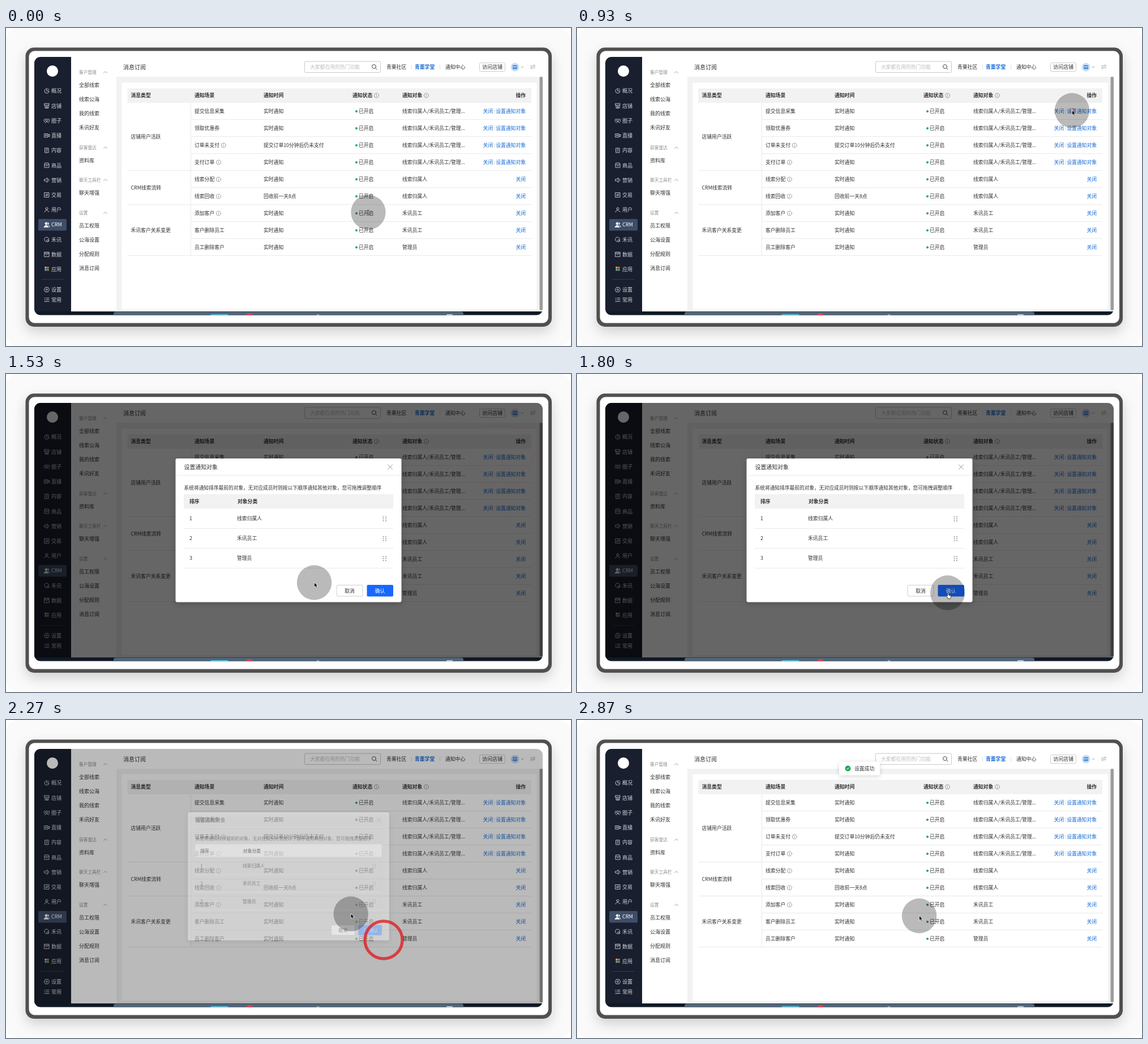
Write an HTML page with a canvas that moves like this. It is 998x561 px and loops after 3.07 s.

```html
<!DOCTYPE html>
<html lang="zh-CN">
<head>
<meta charset="utf-8">
<style>
html, body { margin: 0; height: 100%; overflow: hidden; background: #fff; }
canvas { display: block; width: 998px; height: 561px; }
</style>
</head>
<body>
<canvas></canvas>
<script>
const LOOP = 3070, STEP = 1000 / 15;
const canvas = document.querySelector('canvas'), c = canvas.getContext('2d');
const dpr = window.devicePixelRatio || 1;
canvas.width = 998 * dpr;
canvas.height = 561 * dpr;

const INK = '#303030', BLUE = '#176bd3', LINE = '#e9e9e9', GREY = '#8c8c8c';

const ramp = (t, a, b) => Math.min(1, Math.max(0, (t - a) / (b - a)));
const ease = u => u * u * (3 - 2 * u);

function box(x, y, w, h, fill, r = 0, stroke) {
  c.beginPath();
  c.roundRect(x, y, w, h, r);
  if (fill) { c.fillStyle = fill; c.fill(); }
  if (stroke) { c.strokeStyle = stroke; c.lineWidth = 1; c.stroke(); }
}
function disc(x, y, r, fill) {
  c.beginPath();
  c.arc(x, y, r, 0, 7);
  c.fillStyle = fill;
  c.fill();
}
function text(s, x, y, size = 8.8, color = INK, weight = 400, align = 'left') {
  c.font = `${weight} ${size}px "Noto Sans CJK SC", "Noto Sans", sans-serif`;
  c.textAlign = align;
  c.fillStyle = color;
  c.fillText(s, x, y + size * .38);
  return c.measureText(s).width;
}
function path(d, x, y, color, width = 1, fill) {
  const p = new Path2D(d);
  c.save();
  c.translate(x, y);
  c.lineWidth = width;
  c.lineCap = c.lineJoin = 'round';
  if (fill) { c.fillStyle = fill; c.fill(p); }
  if (color) { c.strokeStyle = color; c.stroke(p); }
  c.restore();
}
function shadowed(blur, dy, alpha, draw) {
  c.save();
  c.shadowColor = `rgba(0,0,0,${alpha})`;
  c.shadowBlur = blur * dpr;
  c.shadowOffsetY = dy * dpr;
  draw();
  c.restore();
}
const info = (x, y) => path('M4 0A4 4 0 1 1-4 0A4 4 0 1 1 4 0M0-.5V2M0-2.1V-2', x, y, '#777', .7);

const FRAME = 'M-4-4H4V4H-4Z';
const MENU = [
  ['概况', 'M0-4A4 4 0 1 0 4 0H0ZM2-4A4 4 0 0 1 4-2'],
  ['店铺', 'M-4-4H4V-1H-4ZM-3-1V4H3V-1M-1 4V1H1V4'],
  ['圈子', 'M-2-1A2 2 0 1 1 2-1A2 2 0 1 1-2-1M-3 4Q0-1 3 4M-4 2Q-6-3-3-3M4 2Q6-3 3-3'],
  ['直播', 'M-4-3H2V3H-4ZM2-1L5-2V2L2 1M-2-1V1L0 0Z'],
  ['内容', 'M-3-4H3V4H-3ZM-1-2H1M-1 0H1M-1 2H0'],
  ['商品', 'M-3-4H3L4-1V4H-4V-1ZM-4-1H4M-1 1H1'],
  ['营销', 'M-4-1.5H-2L1-4V4L-2 1.5H-4ZM3-2Q5 0 3 2'],
  ['交易', FRAME + 'M-2 1H2M2-1H-2M1-2L2-1M-1 2L-2 1'],
  ['用户', 'M-2-2A2 2 0 1 1 2-2A2 2 0 1 1-2-2M-4 4Q-3 0 1 1M2 3H4'],
  ['CRM', 'M-3-2A2 2 0 1 1 1-2A2 2 0 1 1-3-2M-5 4Q-1-2 3 4ZM2-4Q5-2 2 0M3 1Q5 2 5 4'],
  ['禾讯', 'M3 2A4 4 0 1 0-1 3.8M0 1Q2-1 4 3L1 4Z'],
  ['数据', FRAME + 'M-2 0L0 1L2-1M-4-2H4'],
  ['应用', ''],
  ['设置', 'M-4.5 0L-2.3-4H2.3L4.5 0L2.3 4H-2.3ZM-1.5 0A1.5 1.5 0 1 1 1.5 0A1.5 1.5 0 1 1-1.5 0'],
  ['常用', 'M-4-3H-3M-1-3H4M-4 0H-3M-1 0H4M-4 3H4'],
];

function sidebar() {
  box(50, 51, 65, 449, '#191f2e');
  disc(82, 76, 10, '#fff');
  MENU.forEach(([name, icon], i) => {
    const y = i < 13 ? 111 + i * 26.22 : 461.5 + (i - 13) * 18;
    const on = name === 'CRM';
    if (on) box(57, 337, 50, 20.5, '#3e4d68', 2);
    const color = on ? '#fff' : '#d0d3d9';
    if (icon) path(icon, 72, y, color, .9, on && '#fff');
    else ['#f5a623', '#ef5350', '#42a5f5', '#4caf50'].forEach((dot, k) =>
      disc(70 + k % 2 * 4, y - 3 + (k >> 1) * 4, 1.9, dot));
    text(name, 80, y, 9.1, color);
  });
  box(62, 443, 40, 1, '#333a48');
}

const GROUPS = [
  [78, '客户管理', 101, '全部线索', '线索公海', '我的线索', '禾讯好友'],
  [211, '获客雷达', 234, '资料库'],
  [268, '聊天工具栏', 291, '聊天增强'],
  [326, '设置', 349, '员工权限', '公海设置', '分配规则', '消息订阅'],
];
function submenu() {
  for (const [y, title, top, ...items] of GROUPS) {
    text(title, 129, y, 7.7, GREY);
    path('M-3 1.5L0-1.5L3 1.5', 175.5, y, '#999', .9);
    items.forEach((s, i) => text(s, 129, top + i * 25, 9));
  }
}

function header() {
  text('消息订阅', 207, 69, 10);
  box(527.5, 59, 134, 19.5, '#fff', 2, '#c8c8c8');
  text('大家都在用的热门功能', 537, 69, 8.8, '#bdbdbd');
  path('M3 0A3.5 3.5 0 1 1-4 0A3.5 3.5 0 1 1 3 0M2 2.5L4.5 5', 650.5, 68, '#444', 1);
  text('青栗社区', 672, 69);
  text('青栗学堂', 722, 69, 8.8, BLUE, 700);
  text('通知中心', 776, 69);
  box(716, 65, 1, 8, '#ddd');
  box(766, 65, 1, 8, '#ddd');
  box(836.5, 61.5, 45, 15, '#fff', 2, '#ccc');
  text('访问店铺', 859, 69, 9, INK, 500, 'center');
  disc(899, 69, 7.5, '#c9def7');
  box(895, 65.5, 8, 7, '#4c8fe6', 1);
  box(895.5, 68, 7, 1, '#fff');
  path('M-2-1L0 1L2-1', 912, 69, '#999', .9);
  path('M-4-1.5H4L1.5-4M4 1.5H-4L-1.5 4', 930.5, 68.5, '#888', .8);
}

const SOON = '实时通知', OWNER = '线索归属人', STAFF = '禾讯员工', ALL = OWNER + '/' + STAFF + '/管理...';
const ROWS = [
  ['提交信息采集', SOON, ALL],
  ['领取优惠券', SOON, ALL],
  ['订单未支付', '提交订单10分钟后仍未支付', ALL, 1],
  ['支付订单', SOON, ALL, 1],
  ['线索分配', SOON, OWNER, 1],
  ['线索回收', '回收前一天8点', OWNER, 1],
  ['添加客户', SOON, STAFF, 1],
  ['客户删除员工', SOON, STAFF],
  ['员工删除客户', SOON, '管理员'],
];
function table() {
  box(214.5, 106.5, 713.5, 25.5, '#f2f2f2');
  const heads = [['消息类型', 220.5], ['通知场景', 333], ['通知时间', 455], ['通知状态', 612], ['通知对象', 700]];
  for (const [s, x] of heads) {
    const w = text(s, x, 119, 8.8, INK, 700);
    if (x > 600) info(x + w + 7.3, 119);
  }
  text('操作', 918, 119, 8.8, INK, 700, 'right');
  ROWS.forEach(([scene, when, who, hint], i) => {
    const y = 147 + i * 30;
    const w = text(scene, 333, y);
    if (hint) info(333 + w + 7.3, y);
    text(when, 455, y);
    disc(619, y, 2, '#18a957');
    text('已开启', 623, y);
    text(who, 700, y);
    if (who === ALL) {
      text('关闭', 842.6, y, 8.8, BLUE);
      box(862.5, y - 4, 1, 8, '#ddd');
      text('设置通知对象', 918, y, 8.8, BLUE, 400, 'right');
    } else text('关闭', 918, y, 8.8, BLUE, 400, 'right');
    const left = [3, 5, 8].includes(i) ? 214.5 : 326;
    box(left, y + 14, 928 - left, 1, LINE);
  });
  box(326, 132, 1, 270, LINE);
  text('店铺用户活跃', 220.5, 192);
  text('CRM线索流转', 220.5, 282);
  text('禾讯客户关系变更', 220.5, 357);
}

function dock() {
  box(50, 500, 898, 7, '#101a26');
  box(190, 500.5, 618, 12, '#52667a', 4);
  box(361, 505, 32, 4, '#5fd3ea', 2);
  disc(430, 510, 7, '#e04848');
  disc(551, 508, 3, '#d8c9a0');
  box(778, 505, 11, 2, '#dde3e8', 1);
}

function modal(busy) {
  shadowed(10, 3, .2, () => box(299.5, 149, 399, 253.5, '#fff', 3));
  text('设置通知对象', 314.5, 164, 9.9, INK, 500);
  path('M-4-4L4 4M4-4L-4 4', 678.5, 164, '#888', .9);
  box(299.5, 178.5, 399, 1, LINE);
  text('系统将通知排序最前的对象，无对应成员时则按以下顺序通知其他对象，您可拖拽调整顺序', 314.5, 200.5, 8.73);
  box(314, 212, 370, 25.5, '#f2f2f2');
  text('排序', 324, 225, 8.8, INK, 700);
  text('对象分类', 409, 225, 8.8, INK, 700);
  [OWNER, STAFF, '管理员'].forEach((s, i) => {
    const y = 255 + i * 35;
    text(i + 1, 324, y);
    text(s, 408, y);
    for (let k = 0; k < 6; k++) disc(666.5 + k % 2 * 4.5, y - 3 + (k >> 1) * 3.5, .9, '#888');
    box(314, y + 17, 370, 1, LINE);
  });
  box(584, 372.5, 46, 19.5, '#fff', 2, '#cfcfcf');
  text('取消', 607, 382.5, 8.8, INK, 400, 'center');
  box(637.5, 372, 46.5, 20.5, busy ? '#4f92ff' : '#1768ff', 2);
  text('确认', busy ? 668 : 660.5, 382.5, 8.8, '#fff', 500, 'center');
  if (busy) path('M3 0A3 3 0 1 1 0-3', 651.5, 382, '#fff', .9);
}

function toast() {
  shadowed(8, 2, .16, () => box(463, 73.5, 72, 24, '#fff', 2));
  disc(478.5, 85.5, 5, '#16ad55');
  path('M-2 0L-.6 1.6L2.2-1.5', 478.5, 85.5, '#fff', 1);
  text('设置成功', 490, 85.5);
}

function ring(x, y, age) {
  if (age <= 0 || age > 630) return;
  c.globalAlpha = .85 * (1 - (age / 640) ** 4);
  c.beginPath();
  c.arc(x, y, age * .092, 0, 7);
  c.lineWidth = Math.max(.8, 8 * (1 - (age / 620) ** 2));
  c.strokeStyle = '#e0181e';
  c.stroke();
  c.globalAlpha = 1;
}

// Pointer stops: time, x, y
const STOPS = [[1320, 874.5, 145.5], [1530, 544.5, 368], [1600, 548, 369], [1850, 667, 388],
  [1950, 667, 388], [2130, 624, 331], [2330, 604.5, 345.5]];
function pointerAt(t) {
  if (t < 866) {
    const u = ramp(t, 340, 866), v = 1 - u;
    const curve = (a, b, d, e) => v * v * v * a + 3 * v * v * u * b + 3 * v * u * u * d + u * u * u * e;
    return [curve(640, 720, 1110, 874.5), curve(325, 520, 545, 145.5)];
  }
  const i = STOPS.findIndex(s => s[0] > t);
  if (i < 1) return (i ? STOPS.at(-1) : STOPS[0]).slice(1);
  const [t0, x0, y0] = STOPS[i - 1], [t1, x1, y1] = STOPS[i];
  const u = ease(ramp(t, t0, t1));
  return [x0 + (x1 - x0) * u, y0 + (y1 - y0) * u];
}
function pointer(t) {
  const [x, y] = pointerAt(t);
  disc(x, y, 30.7, 'rgba(0,0,0,.27)');
  if (t < 399) path('M-1.5-4Q0-4 0-3Q0-4 1.5-4M0-3V4M-1.5 5Q0 5 0 4Q0 5 1.5 5', x, y, '#444', .8);
  else if (t > 1790 && t < 2190)
    path('M-1 5L-3.5 1Q-3.5-.5-1.5 1V-3.5Q-.5-5 .5-3.5V-.5L4 .5Q5 2 3.5 6H-.5Z', x + 1.5, y + 4.5, '#222', .8, '#fff');
  else path('M0 0V8L2 6.3L3.4 9.2L5 8.5L3.6 5.7H6Z', x, y, '#fff', .7, '#000');
}

function draw(t) {
  c.setTransform(dpr, 0, 0, dpr, 0, 0);
  box(0, 0, 998, 561, '#fff');
  box(0, 0, 998, 561, '#fafafa', 22);
  shadowed(22, 9, .17, () => box(34.5, 34.5, 929.5, 492.5, '#505050', 15));
  box(40.5, 40.5, 917.5, 480, '#fff', 10);

  c.save();
  c.beginPath();
  c.roundRect(50, 51, 898, 455.5, 11);
  c.clip();
  box(50, 51, 898, 456, '#fff');
  dock();
  box(115, 51, 833, 449, '#fff');
  sidebar();
  submenu();
  header();
  box(195, 86, 753, 414, '#f2f2f2');

  const loading = ramp(t, 2260, 2400) * (1 - ramp(t, 2590, 2800));
  c.save();
  if (t > 2250) c.translate(0, -1);
  box(204.5, 96.5, 733, 400, '#fff');
  c.globalAlpha = 1 - .64 * loading;
  table();
  c.restore();
  if (loading) {
    c.globalAlpha = loading;
    c.beginPath();
    c.ellipse(572, 253, 12, 18.5, 0, 0, 7);
    c.fillStyle = '#efefef';
    c.fill();
    c.globalAlpha = 1;
  }
  box(942.5, 86, 5.5, 412, '#9c9c9c', 2);

  const open = ramp(t, 1060, 1200) * (1 - ramp(t, 2190, 2330));
  if (open) {
    c.globalAlpha = open;
    box(50, 51, 898, 449, 'rgba(0,0,0,.6)');
    const s = .8 + .2 * open;
    c.translate(499 * (1 - s), 276 * (1 - s));
    c.scale(s, s);
    modal(t > 1990);
  }
  c.restore();

  const shown = ease(ramp(t, 2320, 2470));
  if (shown) {
    c.save();
    c.globalAlpha = shown;
    c.translate(0, 14 * (shown - 1));
    toast();
    c.restore();
  }
  ring(874.5, 145.5, t - 930);
  ring(667, 388, t - 1907);
  pointer(t);
}

function tick(now) {
  const t = now % LOOP;
  draw(Math.floor((t + 4) / STEP) * STEP);
  requestAnimationFrame(tick);
}
requestAnimationFrame(tick);
</script>
</body>
</html>
```
